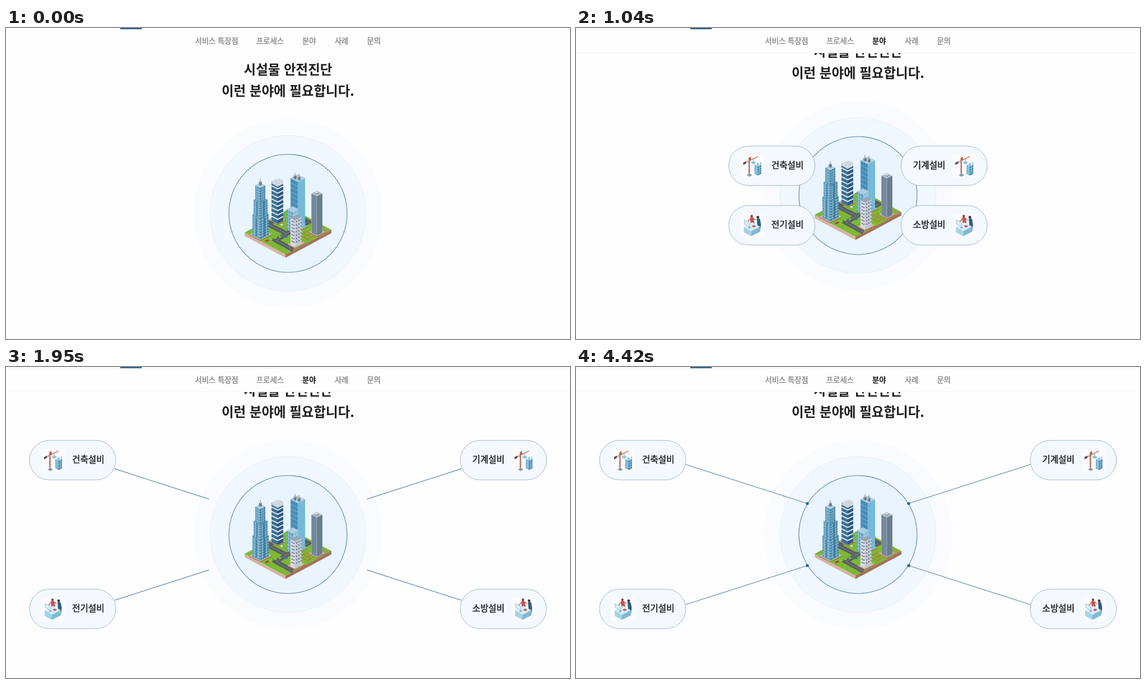
Recreate the animation shown at these times as an HTML page. Size 1007x556 px, loop 4.55 s.

```html
<!DOCTYPE html>
<html lang="ko">
<head>
<meta charset="utf-8">
<style>
html, body { margin: 0; width: 100%; height: 100%; overflow: hidden; background: #fefefe; }
svg { display: block; width: 1007px; height: 556px; }
text { font-family: "Noto Sans CJK KR", "Noto Sans KR", "Noto Sans CJK", "Noto Sans CJK JP", sans-serif; }
.title { font-size: 23.5px; font-weight: 700; fill: #1c1c1c; text-anchor: middle; }
/* A hairline stroke gives the regular cut a medium weight. */
.nav text { font-size: 13.3px; fill: #858789; stroke: #858789; stroke-width: .4px; }
.nav .on { font-weight: 700; fill: #111; stroke: none; }
.card text { font-size: 15.7px; fill: #25282c; stroke: #25282c; stroke-width: .55px; }
</style>
</head>
<body>
<svg viewBox="0 0 1007 556">
  <defs>
    <g id="crane">
      <rect width="42" height="42" rx="4" fill="#fbfbfe"/>
      <path d="M11 37l5-2.500 5 2.500-5 3z" fill="#6f9fb8"/>
      <path d="M15.500 7V37" stroke="#c8806c" stroke-width="2.400"/>
      <path d="M14.500 9l2 3-2 3 2 3-2 3 2 3-2 3 2 3-2 3" fill="none" stroke="#8f4a40" stroke-width=".7"/>
      <path d="M5 17L31 4" stroke="#cf7f6c" stroke-width="1.800"/>
      <path d="M5 15l5-2.500v4l-5 2.500z" fill="#55494c"/>
      <path d="M15 6l3-2 1 6-3 1z" fill="#b85c4b"/>
      <path d="M23 8v5" stroke="#777" stroke-width=".7"/>
      <path d="M19 14l4-2 4 2v2l-4 2-4-2z" fill="#8fc4dd"/>
      <path d="M25 19l6 3v16l-6-3z" fill="#69a9cb"/>
      <path d="M31 22l6-3v16l-6 3z" fill="#3c82ac"/>
      <path d="M25 19l6-3 6 3-6 3z" fill="#b9dcea"/>
      <path d="M25 23l6 3 6-3M25 27l6 3 6-3M25 31l6 3 6-3M28 21v15M34 21v15" fill="none" stroke="#c9e4f0" stroke-width=".7"/>
      <path d="M31 22v-7M36 19v-5" stroke="#4c93ba"/>
    </g>
    <g id="desk">
      <rect width="42" height="42" rx="4" fill="#fbfbfe"/>
      <path d="M29 9q3.500-3 6 1l1.500 9-1.500 11h-4l-1-9z" fill="#2f5f80"/>
      <circle cx="31" cy="6" r="2.400" fill="#3a3b45"/>
      <path d="M17 7q3-2.500 6 0l2 10-7 1z" fill="#c9514f"/>
      <circle cx="20" cy="4" r="2.200" fill="#84473f"/>
      <path d="M17 9l-4 5M23 8l4 3" stroke="#c9635a" stroke-width="1.600"/>
      <path d="M6 23l15-8 14 8-16 8z" fill="#d6edf6"/>
      <path d="M6 23l13 8v9L6 33z" fill="#a5d3e6"/>
      <path d="M19 31l16-8v9l-16 8z" fill="#7fbad4"/>
      <path d="M7 11l9 5v7l-9-5z" fill="#dceef6" stroke="#84b7cf" stroke-width=".8"/>
      <path d="M20 22l4-2 4 2-4 2.500z" fill="#c4575c"/>
      <path d="M13 25l4-2 2 1-4 2z" fill="#6d96ad"/>
    </g>
  </defs>
  <g id="page">
    <text class="title" x="503.500" y="83">시설물 안전진단</text>
    <text class="title" x="503.500" y="120.500">이런 분야에 필요합니다.</text>
    <g transform="translate(0 31.800)">
      <circle cx="503.500" cy="299.500" r="169" fill="#f9fbff"/>
      <circle cx="503.500" cy="299.500" r="139" fill="#f2f8ff" stroke="#e3eefa"/>
      <circle cx="503.500" cy="299.500" r="105.500" fill="#e9f4fe" stroke="#5784ad" stroke-width="1.100"/>
      <g id="city"></g>
      <g id="lines"></g>
      <g id="cards"></g>
    </g>
  </g>
  <g id="bar">
    <rect width="1007" height="44" fill="#fefefe"/>
    <path d="M0 2H1007M0 44.500H1007" stroke="#edf1f4"/>
  </g>
  <rect x="204" width="38.500" height="2.200" fill="#2e5f86"/>
  <g class="nav">
    <text x="337.500" y="28">서비스 특장점</text>
    <text x="447" y="28">프로세스</text>
    <text id="tab" x="529" y="28">분야</text>
    <text x="587" y="28">사례</text>
    <text x="644.500" y="28">문의</text>
  </g>
</svg>
<script>
const LOOP = 4550, STEP = 130, SCROLL = 31.8;
const CX = 503.5, CY = 299.5;
const $ = id => document.getElementById(id);

// ---------- city ----------
const poly = (pts, fill) => `<polygon points="${pts.join(' ')}" fill="${fill}"/>`;
const path = (d, color, w) => `<path d="${d}" fill="none" stroke="${color}" stroke-width="${w}"/>`;

// Isometric block: front edge at x, foot at y, faces a (left) and b (right) wide.
function block(x, y, a, b, h, left, right, top, rows, cols, ink, w = .8) {
  const t = y - h;
  let s = poly([x, y, x - a, y - a / 2, x - a, t - a / 2, x, t], left)
        + poly([x, y, x + b, y - b / 2, x + b, t - b / 2, x, t], right)
        + poly([x, t, x - a, t - a / 2, x - a + b, t - (a + b) / 2, x + b, t - b / 2], top);
  let d = '';
  for (let i = 1; i < rows; i++) {
    d += `M${x - a} ${t + h * i / rows - a / 2}l${a} ${a / 2}l${b} ${-b / 2}`;
  }
  for (let i = 1; i < cols; i++) {
    const l = a * i / cols, r = b * i / cols;
    d += `M${x - l} ${t - l / 2}v${h}M${x + r} ${t - r / 2}v${h}`;
  }
  return s + path(d, ink, w);
}
const plot = (x, y, a, b) => block(x, y, a, b, 1.5, '#a9775a', '#9a684d', '#c9b5a0', 1, 1, 'none');
const mast = (x, y, h) => block(x, y, 2.5, 2.5, h, '#8c9aa8', '#687786', '#a9b5bf', 3, 1, '#5f6c79')
  + path(`M${x} ${y - h - 2}v-4`, '#7a8792', 1);

let art = poly([426, 334, 499, 373, 499, 379, 426, 340], '#d6b3a3')
  + poly([499, 373, 581, 329, 581, 335, 499, 379], '#a5705a')
  + poly([426, 334, 499, 373, 581, 329, 508, 290], '#7db832')
  + path('M462 316L501 336L482 348L513 365M501 336L540 315L520 304M467 319L492 305', '#595f66', 8)
  + path('M462 316L501 336L482 348L513 365M501 336L540 315', '#a0a5a8', .6)
  + path('M524 339l14-7 14 7-14 7zM531 335.500l14 7M531 342.500l14-7', '#b07a3d', 1.2)
  + path('M566 336l10-5-14-7', '#b58a68', 1.4);
for (let i = 0; i < 6; i++) {
  art += `<circle cx="${473 + i * 4}" cy="${346 - i * 1.2}" r="1.7" fill="${i % 2 ? '#4f962b' : '#93c950'}"/>`;
}
art += plot(485, 320, 15, 14)
  + block(485, 318, 11, 10, 70, '#3d6f93', '#2c5981', '#d3d9e1', 9, 1, '#d3e0e9', 2.2)
  + poly([474, 246, 475, 243, 488, 237, 495, 241, 495, 247, 485, 252], '#d3d7de')
  + plot(521, 333, 17, 17)
  + block(521, 331, 13, 13, 88, '#5298bf', '#74b9dc', '#b9cfdc', 1, 1, 'none')
  + path('M511 240v86M514.500 241v86M518 243v86', '#35759c', 1)
  + path([...Array(10)].map((_, i) => `M508 ${245 + i * 8}l13 6.5`).join(''), '#8fc4de', .7)
  + mast(516, 239, 6) + mast(523, 241, 6)
  + plot(454, 349, 20, 21)
  + block(454, 346, 14, 15, 38, '#5e9dbf', '#4587ac', '#a9ccdc', 8, 4, '#b4d4e3', .7)
  + path('M447 304.500v36M461.500 304.500v36', '#2f6b91', 1.4)
  + block(454, 311, 12, 13, 30, '#5b9abd', '#4284a9', '#a5c8da', 7, 4, '#aed0e1', .7)
  + path('M448 278v28M460.500 278v28', '#2f6b91', 1.2)
  + block(454, 281, 9, 9, 27, '#5897bb', '#4081a7', '#b5d0dd', 6, 3, '#abcee0', .7)
  + mast(454, 250, 6)
  + plot(555, 342, 15, 15)
  + block(555, 339, 10, 10, 70, '#8b9aa9', '#748899', '#b8c2cb', 1, 4, '#586d80', 1)
  + block(555, 266, 4, 4, 2, '#97a4b0', '#7f8d9b', '#d6dce1', 1, 1, 'none')
  + block(512, 334, 11, 11, 36, '#5fa0c3', '#82bbd8', '#accfdf', 6, 3, '#c2deea', .7)
  + plot(516, 363, 13, 18)
  + block(516, 360, 8, 12, 48, '#d9dbe2', '#c3c8d1', '#98a5b4', 1, 1, 'none');
for (let i = 0; i < 7; i++) {
  const y = 316 + i * 6;
  art += path(`M510 ${y - 3}l2 1M513 ${y - 1.5}l2 1M518 ${y - 1}l2-1M522 ${y - 3}l2-1M526 ${y - 5}l1.500-.8`, '#66748a', 2.2);
}
art += poly([462, 349, 467, 346, 470, 348, 465, 351], '#b63a40')
  + poly([497, 342, 501, 340, 504, 342, 500, 344], '#3d78b4')
  + poly([489, 320, 492, 318, 495, 320, 492, 322], '#d8dde0');
$('city').innerHTML = art;

// ---------- cards and lines ----------
const spots = [
  ['건축설비', 'crane', -1, -1], ['기계설비', 'crane', 1, -1],
  ['전기설비', 'desk', -1, 1], ['소방설비', 'desk', 1, 1]
];
$('cards').innerHTML = spots.map(([label, icon, sx]) => `<g class="card">
  <rect x="-77" y="-35.300" width="154" height="70.600" rx="35.300" fill="#f4f9ff" stroke="#9fb5d0"/>
  <use href="#${icon}" x="${sx < 0 ? -56 : 15}" y="-20.500"/>
  <text x="${sx < 0 ? -1 : -55.500}" y="4.500">${label}</text></g>`).join('');
$('lines').innerHTML = spots.map(() =>
  '<g><path stroke="#5f8ab2" stroke-width="1.200"/><circle r="2.600" fill="#1b6298"/></g>').join('');
const cards = [...$('cards').children], lines = [...$('lines').children];

// ---------- motion ----------
const clamp = v => Math.max(0, Math.min(1, v));
const span = (t, from, to) => clamp((t - from) / (to - from));

const SPREAD = [[520, 0], [650, .04], [780, .15], [1040, .4], [1300, .65],
  [1430, .775], [1560, .883], [1690, .96], [1820, .99], [1950, 1]];
function track(keys, t) {
  const i = keys.findIndex(k => k[0] > t);
  if (i === 0) return keys[0][1];
  if (i < 0) return keys[keys.length - 1][1];
  const [t0, v0] = keys[i - 1], [t1, v1] = keys[i];
  return v0 + (v1 - v0) * (t - t0) / (t1 - t0);
}

// Same curve as the CSS "ease" keyword.
function ease(x) {
  const bez = (u, p, q) => 3 * u * (1 - u) ** 2 * p + 3 * u * u * (1 - u) * q + u ** 3;
  let lo = 0, hi = 1;
  for (let i = 0; i < 24; i++) {
    const mid = (lo + hi) / 2;
    bez(mid, .25, .25) < x ? lo = mid : hi = mid;
  }
  return bez(hi, .1, 1);
}

const TILT = 17.8 * Math.PI / 180, LENGTH = 229;

function draw(t) {
  $('page').setAttribute('transform', `translate(0 ${-SCROLL * span(t, 90, 1020)})`);
  $('bar').style.display = t >= 130 ? '' : 'none';
  $('tab').setAttribute('class', t >= 130 ? 'on' : '');

  const p = track(SPREAD, t), fade = span(t, 520, 880);
  const len = LENGTH * ease(span(t, 1690, 2240)), dot = span(t, 2080, 2260);
  spots.forEach(([, , sx, sy], i) => {
    cards[i].setAttribute('transform', `translate(${CX + sx * 384.5 * p} ${CY + sy * 133 * p})`);
    cards[i].style.opacity = fade;

    // Each line widens from its outer end while tilted about its own middle.
    const mx = 314 - len / 2, dx = len / 2 * Math.cos(TILT), dy = len / 2 * Math.sin(TILT);
    const at = (x, y) => [CX + sx * x, CY + sy * y];
    const end = at(mx - dx, 90.5 - dy);
    const [path, spot] = lines[i].children;
    path.setAttribute('d', `M${at(mx + dx, 90.5 + dy)}L${end}`);
    spot.setAttribute('cx', end[0]);
    spot.setAttribute('cy', end[1]);
    spot.style.opacity = dot;
    lines[i].style.display = len ? '' : 'none';
  });
}

const start = performance.now();
function tick() {
  const t = (performance.now() - start) % LOOP;
  draw(Math.floor(t / STEP) * STEP);
  requestAnimationFrame(tick);
}
tick();
</script>
</body>
</html>
```
